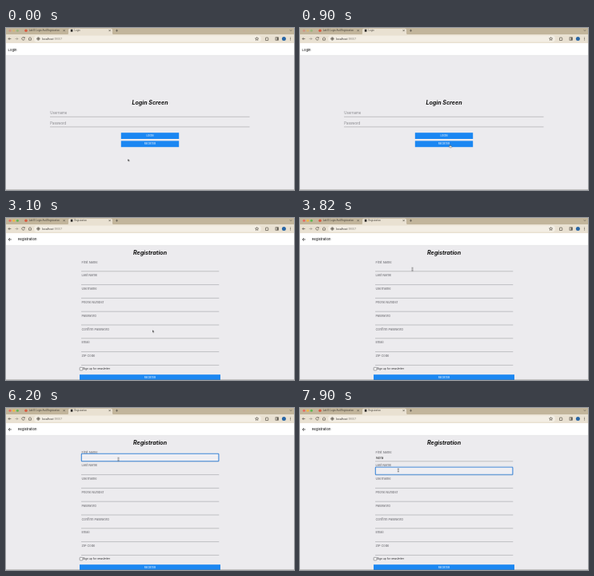
Recreate the animation shown at these times as an HTML page. Size 360 by 203 pixels, loop 8 s.

```html
<!DOCTYPE html>
<html lang="en">
<head>
<meta charset="utf-8">
<title>Registration demo</title>
<style>
  html, body { margin: 0; width: 100%; height: 100%; overflow: hidden; background: #ecebee; }
  svg { display: block; width: 360px; height: 203px; font-family: Inter, "Liberation Sans", sans-serif; }
  .icon { fill: none; stroke: #5d584e; stroke-width: .7; }
  .tab { font-size: 2.75px; fill: #3f3a33; }
  .head { font-size: 4.1px; font-weight: 500; fill: #222; }
  .title { font-size: 7.1px; font-weight: 700; font-style: italic; text-anchor: middle; fill: #111; }
  .hint { font-size: 4.3px; fill: #85858a; }
  .label { font-size: 3.9px; font-weight: 500; fill: #77777c; }
  .line { stroke: #adadb0; stroke-width: .7; }
  .btn { fill: #1b87f2; }
  .cap { font-size: 3px; font-weight: 500; text-anchor: middle; fill: #e4f1ff; }

  .login, .register, .lights, .ring, .key, .arrow, .hand, .beam {
    animation: 8s step-end infinite;
  }
  .login { animation-name: login; }
  .register { animation-name: register; }
  .lights { animation-name: lights; }
  .ring { animation-name: ring; fill: #efeff3; stroke: #3c86d8; stroke-width: 1.1; }
  .k1 { animation-name: k1; } .k2 { animation-name: k2; }
  .k3 { animation-name: k3; } .k4 { animation-name: k4; }
  .arrow { animation-name: arrow; }
  .hand { animation-name: hand; }
  .beam { animation-name: beam; }
  .cursor { animation: move 8s ease-in-out infinite; }

  @keyframes login { 0% { opacity: 1 } 29.5%, 100% { opacity: 0 } }
  @keyframes register { 0% { opacity: 0 } 29.5%, 100% { opacity: 1 } }
  @keyframes lights { 0% { opacity: .4 } 22.75%, 100% { opacity: 1 } }
  @keyframes ring {
    0% { opacity: 0; transform: none }
    55.75% { opacity: 1; transform: none }
    97.75%, 100% { opacity: 1; transform: translateY(16.8px) }
  }
  @keyframes k1 { 0% { fill-opacity: 0 } 82%, 100% { fill-opacity: 1 } }
  @keyframes k2 { 0% { fill-opacity: 0 } 83%, 100% { fill-opacity: 1 } }
  @keyframes k3 { 0% { fill-opacity: 0 } 86.25%, 100% { fill-opacity: 1 } }
  @keyframes k4 { 0% { fill-opacity: 0 } 88.25%, 100% { fill-opacity: 1 } }
  @keyframes arrow { 0% { opacity: 1 } 8% { opacity: 0 } 29.5% { opacity: 1 } 46% { opacity: 0 } 100% { opacity: 0 } }
  @keyframes hand { 0% { opacity: 0 } 8% { opacity: 1 } 29.5%, 100% { opacity: 0 } }
  @keyframes beam { 0% { opacity: 0 } 46%, 100% { opacity: 1 } }
  @keyframes move {
    0%, .25% { transform: translate(152.3px, 164px) }
    10.25%, 10.75% { transform: translate(187.5px, 146px) }
    16.25%, 29% { transform: translate(186px, 146.5px) }
    39%, 39.5% { transform: translate(183px, 140.3px) }
    47.75%, 90.75% { transform: translate(140.5px, 64.2px) }
    97.5%, 100% { transform: translate(122.8px, 78px) }
  }
</style>
</head>
<body>
<svg viewBox="0 0 360 203">
  <rect width="360" height="203" fill="#ecebee"/>

  <!-- browser frame -->
  <rect width="360" height="9" fill="#c2b59b"/>
  <path d="M76 8.5Q78 8.5 78 6.5V2.5Q78 .8 79.7 .8H131.3Q133 .8 133 2.5V6.5Q133 8.5 135 8.5Z" fill="#e9e1d2"/>
  <rect y="8" width="360" height="11" fill="#e9e1d2"/>
  <rect x="35" y="9.6" width="284" height="7.8" rx="3.9" fill="#f3eee4"/>
  <g class="lights">
    <circle cx="5" cy="3.2" r="1.5" fill="#ec6a5e"/>
    <circle cx="9.7" cy="3.2" r="1.5" fill="#f0b944"/>
    <circle cx="14.4" cy="3.2" r="1.5" fill="#5fb851"/>
  </g>
  <circle cx="25" cy="3.2" r="1.7" fill="#d9593f"/>
  <text class="tab" x="28.7" y="4.2">Lab 8: Login And Registration</text>
  <rect x="80.8" y="1.7" width="2.6" height="3" fill="#2d2b29"/>
  <g class="icon">
    <path d="M71.6 2.2l2 2m0-2l-2 2M128.6 2.2l2 2m0-2l-2 2M137 3.2h3M138.5 1.7v3M354.8 2.4l1.2 1.2l1.2-1.2"/>
    <path d="M6.4 13.5H3M4.6 11.9L3 13.5l1.6 1.6"/>
    <path d="M11.5 13.5h3.4M13.3 11.9l1.6 1.6l-1.6 1.6" opacity=".5"/>
    <path d="M23.2 12.5A1.8 1.8 0 1 0 23.3 14M23.4 11.4v1.3h-1.3"/>
    <path d="M28 13.4l2-1.8l2 1.8M28.6 13v2.2h2.8V13"/>
    <circle cx="40.4" cy="13.5" r="1.7"/>
    <path d="M38.7 13.5h3.4M40.4 11.8v3.4"/>
    <path d="M313.6 11.5l.6 1.4l1.5.1l-1.2 1l.4 1.4l-1.3-.8l-1.3.8l.4-1.4l-1.2-1l1.5-.1z"/>
    <path d="M324.5 12.3h1.1q.5-1.4 1 0h1v1.1q1.3.5 0 1v1.1h-3.1z"/>
    <rect x="337" y="11.8" width="3.4" height="3.4"/>
    <path d="M339.4 11.8v3.4" stroke-width="1.4"/>
  </g>
  <circle cx="347.4" cy="13.5" r="2.5" fill="#2866a5"/>
  <g fill="#5d584e">
    <circle cx="355.6" cy="11.9" r=".5"/><circle cx="355.6" cy="13.5" r=".5"/><circle cx="355.6" cy="15.1" r=".5"/>
  </g>
  <text x="45" y="14.7" font-size="3.4" fill="#302d29">localhost<tspan fill="#8b857b">:19007</tspan></text>
  <rect y="19" width="360" height="15.2" fill="#fff"/>
  <path d="M0 34.4H360" stroke="#dedee0" stroke-width=".4"/>

  <g class="login">
    <text class="tab" x="85.5" y="4.2">Login</text>
    <text class="head" x="2.6" y="28.6">Login</text>
    <text class="title" x="180" y="95.5">Login Screen</text>
    <text class="hint" x="55.3" y="108">Username</text>
    <text class="hint" x="55.3" y="120.6">Password</text>
    <path class="line" d="M55 111.3H304.5M55 123.9H304.5"/>
    <rect class="btn" x="143.8" y="131.2" width="72.4" height="7.8"/>
    <text class="cap" x="180" y="136.2">LOGIN</text>
    <rect class="btn" x="143.8" y="141.4" width="72.4" height="7.8"/>
    <text class="cap" x="180" y="146.4">REGISTER</text>
  </g>

  <g class="register">
    <text class="tab" x="85.5" y="4.2">Registration</text>
    <path class="icon" d="M6.8 26.9H3.2M5 25.1l-1.8 1.8l1.8 1.8" style="stroke:#222"/>
    <text class="head" x="15" y="28.4">Registration</text>
    <text class="title" x="180" y="46.3">Registration</text>
    <g id="fields"></g>
    <rect class="ring" x="94.3" y="57.3" width="171.6" height="9.4" rx=".8"/>
    <text x="95" y="63.7" font-size="4.1" fill="#222"><tspan class="key k1">N</tspan><tspan class="key k2">o</tspan><tspan class="key k3">r</tspan><tspan class="key k4">a</tspan></text>
    <rect x="92.2" y="187.3" width="3.6" height="3.6" rx=".5" fill="#fff" stroke="#69696c" stroke-width=".6"/>
    <text x="96.2" y="190.3" font-size="3.25" fill="#29292b">Sign up for newsletter</text>
    <rect class="btn" x="92" y="196.2" width="176" height="7"/>
    <text class="cap" x="180" y="200.9">REGISTER</text>
  </g>

  <path d="M0 202.8H360" stroke="#77736c" stroke-width=".5"/>

  <g class="cursor">
    <path class="arrow" d="M0 0V3.2L.8 2.5L1.3 3.6L1.9 3.3L1.4 2.3H2.4Z" fill="#111" stroke="#fff" stroke-width=".25"/>
    <path class="hand" d="M-.4 .2Q0-.3 .4 .2V1.5L2 1.9Q2.3 2.1 2.1 2.8L1.7 3.9H-.1L-1.3 2.4Q-1.2 1.8-.4 2.3Z" fill="#fff" stroke="#222" stroke-width=".4"/>
    <path class="beam" d="M-.9-2Q0-2 0-1.4Q0-2 .9-2M0-1.5V1.5M-.9 2Q0 2 0 1.4Q0 2 .9 2" fill="none" stroke="#333" stroke-width=".55"/>
  </g>
</svg>
<script>
  const names = ["First Name", "Last Name", "Username", "Phone Number",
    "Password", "Confirm Password", "Email", "ZIP Code"];
  document.getElementById("fields").innerHTML = names.map((name, i) => {
    const y = 56.5 + i * 16.8;
    return `<text class="label" x="94.4" y="${y}">${name}</text>
      <path class="line" d="M94 ${y + 10.3}H266.3"/>`;
  }).join("");
</script>
</body>
</html>
```
